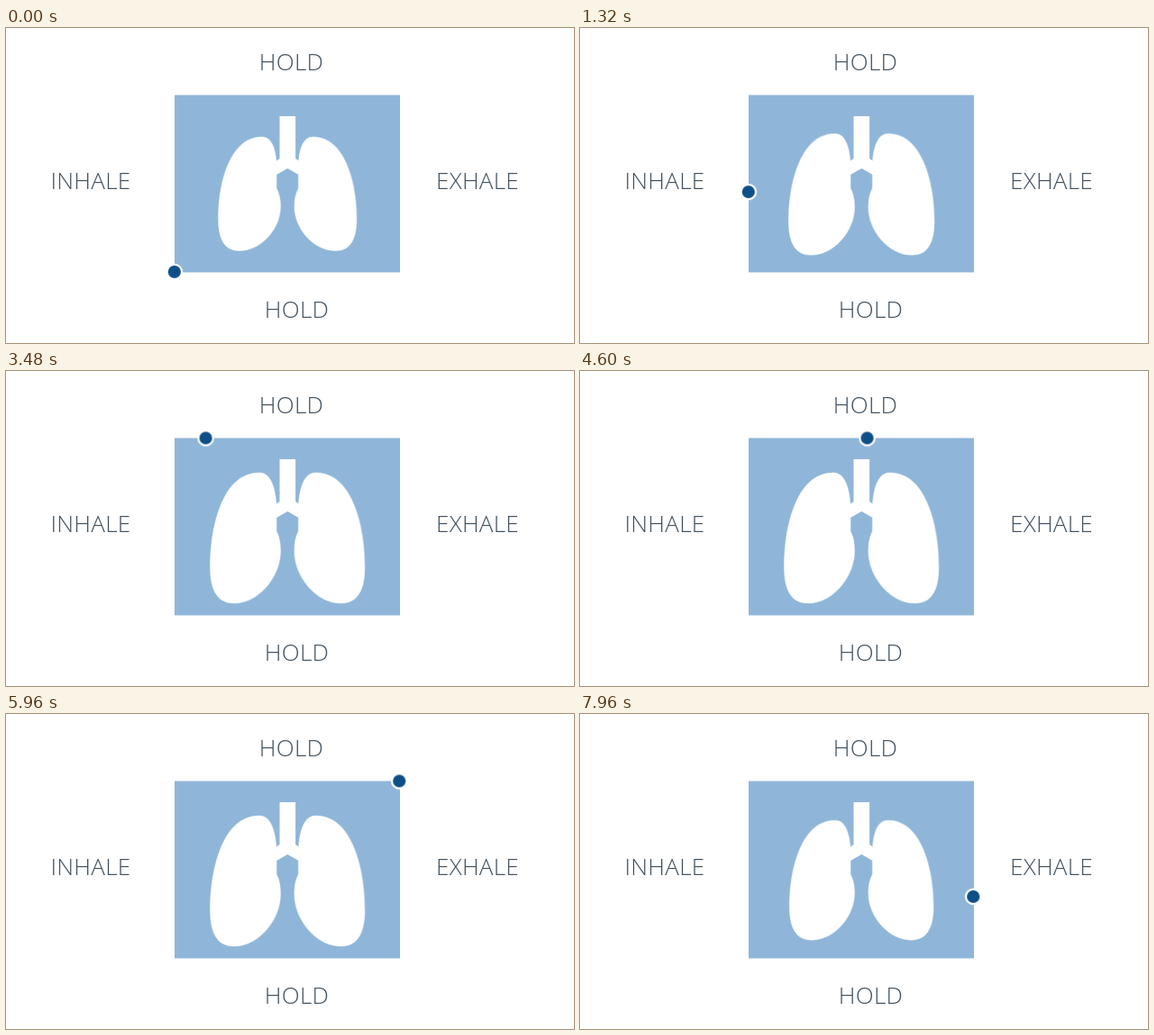
An HTML page for the animation above (8000 ms loop, 630x350 px).

```html
<!DOCTYPE html>
<html lang="en">
<head>
<meta charset="utf-8">
<title>Box breathing</title>
<style>
html, body { margin: 0; width: 100%; height: 100%; overflow: hidden; background: #fff; }
svg { display: block; width: 100%; height: 100%; }
text {
  font: 300 26px "Open Sans", "Noto Sans", sans-serif;
  letter-spacing: 0.27px;
  text-anchor: middle;
  fill: #42525f;
}
.lungs { fill: #fff; }
.lung {
  stroke: #fff;
  stroke-opacity: 0.4;
  stroke-width: 1.2;
  animation: breathe 8s linear infinite;
}
.dot {
  fill: #0f4f88;
  stroke: #fff;
  stroke-width: 2.2;
  animation: travel 8s linear infinite;
}

/* inhale, hold, then the first two thirds of the exhale */
@keyframes travel {
  0% { transform: translate(186.8px, 271px); }
  36.5%, 38.5% { transform: translate(186.8px, 74.5px); }
  74.5%, 76% { transform: translate(436.2px, 74.5px); }
  100% { transform: translate(436.2px, 205.5px); }
}
@keyframes breathe {
  0% {
    d: path("M299.8 148C299 138 296 121 284 121C248.5 121 235.5 172 235.5 212C235.5 233.5 242 247.5 258.5 247.5C283 247.5 304.5 223 304.5 198C304.5 190 303 184 300 178L300 163Z");
  }
  36.5%, 76% {
    d: path("M299.8 148C299 134 295 113 281 113C240 113 226.5 173 226.5 218C226.5 241 233 258 253 258C280.5 258 304.5 228 304.5 200C304.5 190 303 184 300 178L300 163Z");
  }
  100% {
    d: path("M299.8 148C299 136.7 295.7 118.3 283 118.3C245.7 118.3 232.5 172.3 232.5 214C232.5 236 239 251 256.7 251C282.2 251 304.5 224.7 304.5 198.7C304.5 190 303 184 300 178L300 163Z");
  }
}
</style>
</head>
<body>
<svg viewBox="0 0 630 350">
  <rect x="187" y="74.5" width="250" height="197" fill="#8fb6d9"/>
  <g class="lungs">
    <path d="M303.5 98H321.1V145L325.2 148V163H324.6L312.3 156L300 163H299.4V148L303.5 145Z"/>
    <path class="lung"/>
    <g transform="translate(624.4) scale(-1 1)"><path class="lung"/></g>
  </g>
  <text x="316.5" y="46.5">HOLD</text>
  <text x="94" y="178.5">INHALE</text>
  <text x="523" y="178.5">EXHALE</text>
  <text x="322.5" y="321.5">HOLD</text>
  <circle class="dot" r="8.2"/>
</svg>
</body>
</html>
```
